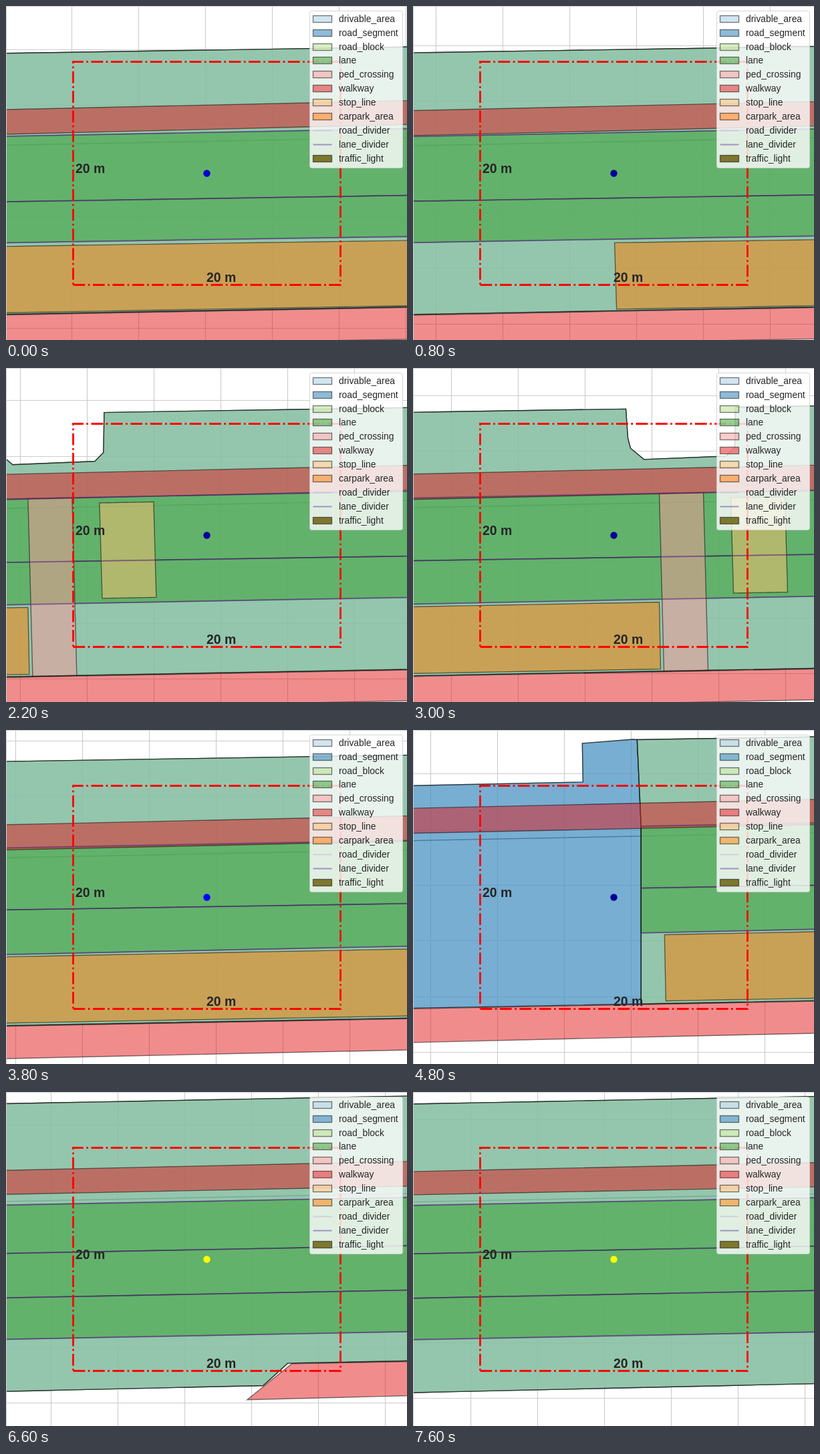
These frames come from a looping animation (600 px wide and 500 px high, 7.8 s). An HTML page:

```html
<!DOCTYPE html>
<html lang="en">
<head>
<meta charset="utf-8">
<title>Map patch drive</title>
<style>
  html, body { margin: 0; width: 100%; height: 100%; overflow: hidden; background: #fff; }
  svg { display: block; width: 600px; height: 500px; }
  text { font-family: "Liberation Sans", Arial, sans-serif; fill: #262626; }
  .area { fill-opacity: .5; stroke: #000; stroke-opacity: .5; stroke-width: 1.39; }
  .line { fill: none; stroke-width: 2.08; stroke-opacity: .5; }
  .thin { stroke-width: 1.39; }
  .grid { fill: none; stroke: #ccc; stroke-width: 1.11; }
  .size { font-size: 19.44px; font-weight: bold; }
  .label { font-size: 13.89px; }
</style>
</head>
<body>
<svg id="stage" viewBox="0 0 600 500"></svg>
<script>
const STEP = 200, STEPS = 39;
const EAST = 700, WEST = -3300;
const COLORS = {
  drivable_area: '#a6cee3', road_segment: '#1f78b4', road_block: '#b2df8a',
  lane: '#33a02c', ped_crossing: '#fb9a99', walkway: '#e31a1c',
  stop_line: '#fdbf6f', carpark_area: '#ff7f00',
  road_divider: '#cab2d6', lane_divider: '#6a3d9a', traffic_light: '#7e772e'
};

const stage = document.getElementById('stage');

function add(parent, tag, attrs, text) {
  const node = document.createElementNS('http://www.w3.org/2000/svg', tag);
  for (const key in attrs) node.setAttribute(key, attrs[key]);
  if (text) node.textContent = text;
  return parent.appendChild(node);
}

// Every road edge is a gentle parabola y(x) in map coordinates.
const curve = (y, slope, bend = 0) => x => y - slope * x + bend * 1e-6 * x * x;
const shifted = (edge, dy) => x => edge(x) + dy;
const on = (edge, x) => [x, edge(x)];
const trace = (edge, from, to, n = 16) =>
  Array.from({ length: n + 1 }, (_, i) => on(edge, from + (to - from) * i / n));
const band = (upper, lower, from, to) => [...trace(upper, from, to), ...trace(lower, to, from)];
const block = (upper, lower, from, to, skew) =>
  [...trace(upper, from, to), ...trace(lower, to + skew, from + skew)];

const edges = {
  topEast: curve(70.8, .0158),
  topWest: curve(64.4, .019),
  bottomEast: curve(461.5, .0187),
  bottomWest: curve(485.6, .0224),
  inner: curve(208.5, .0198),
  walkTop: curve(155, .0223),
  walkBottom: curve(192, .024, -.75),
  sidewalkBottom: curve(508.9, .0174, 1.62),
  carparkTop: curve(359.9, .0155, 1.5),
  carparkBottom: curve(459.3, .0177)
};
const lanesEast = [curve(195, .019), curve(293, .0158), curve(354.5, .0165, 1.6)];
const lanesWest = [215.6, 288, 354.5, 416.6].map(y => curve(y, .0192));
const laneEast = -1687, laneWest = -2106;

const eastSide = [on(edges.topEast, -1693), [laneEast, 228], on(edges.bottomEast, laneEast)];
const westSide = [on(edges.topWest, -2110), [laneWest, 256], [laneWest, 457], on(edges.bottomEast, -2100)];
const driveway = [[-937, 44], [-933, 59], [-913, 76], [-790, 73], [-777, 60]]
  .map(([x, depth]) => [x, edges.topEast(x) + depth]);

const roadEast = [
  ...trace(edges.topEast, -1693, -940), ...driveway, ...trace(edges.topEast, -776, EAST),
  ...trace(edges.bottomEast, EAST, laneEast), eastSide[1]
];
const roadWest = [
  ...trace(edges.topWest, WEST, -2110), ...westSide,
  on(edges.bottomEast, -2347), ...trace(edges.bottomWest, -2384, WEST)
];
const junction = [
  [-2039, 101], [-2037, 166.5], [-1774, 161], [-1775, 103], [-1699, 97],
  ...eastSide, ...[...westSide].reverse()
];

function buildMap(map) {
  const areas = (kind, ...shapes) => shapes.forEach(points =>
    add(map, 'polygon', { class: 'area', fill: COLORS[kind], points: points.join(' ') }));
  const line = (points, stroke, style = 'line') =>
    add(map, 'polyline', { class: style, stroke, points: points.join(' ') });
  const lanes = (lines, from, to) =>
    lines.slice(1).map((lower, i) => band(lines[i], lower, from, to));

  areas('drivable_area', roadEast, junction, roadWest);
  line(trace(edges.inner, WEST, EAST), '#000', 'line thin');
  areas('road_segment', roadEast, junction, roadWest);
  areas('road_block', roadEast, roadWest);
  areas('lane', ...lanes(lanesEast, laneEast, EAST), ...lanes(lanesWest, WEST, laneWest));
  areas('ped_crossing', block(lanesEast[0], edges.bottomEast, -890, -824, 7));
  areas('walkway',
    band(edges.walkTop, edges.walkBottom, WEST, EAST),
    [...trace(shifted(edges.bottomEast, 1), -2341, EAST), ...trace(edges.sidewalkBottom, EAST, -2408)]);
  areas('stop_line', block(shifted(lanesEast[0], 8.6), shifted(lanesEast[2], -7), -783, -702, 4));
  areas('carpark_area',
    block(edges.carparkTop, edges.carparkBottom, -34, EAST, 3),
    block(edges.carparkTop, edges.carparkBottom, -1652, -890, 2));
  lanesEast.forEach(lane => line(trace(lane, laneEast, EAST), COLORS.lane_divider));
  lanesWest.forEach(lane => line(trace(lane, WEST, laneWest), COLORS.lane_divider));
}

function buildLegend() {
  add(stage, 'rect', {
    x: 454.5, y: 7.5, width: 139, height: 235, rx: 3,
    fill: '#fff', 'fill-opacity': .8, stroke: '#ccc', 'stroke-opacity': .8
  });
  Object.entries(COLORS).forEach(([name, color], i) => {
    const baseline = Math.round(23.7 + i * 20.9);
    if (name.endsWith('divider')) {
      add(stage, 'path', { class: 'line', stroke: color, d: `M459.5 ${baseline - 4.5}h28` });
    } else {
      const swatch = add(stage, 'rect', { class: 'area', x: 459.5, y: baseline - 9.5, width: 28, height: 10, fill: color });
      if (name === 'traffic_light') swatch.style.fillOpacity = 1;
    }
    add(stage, 'text', { class: 'label', x: 498, y: baseline }, name);
  });
}

const grid = add(stage, 'path', { class: 'grid' });
const map = add(stage, 'g', {});
buildMap(map);
add(stage, 'path', { class: 'grid', d: 'M.5 500V.5H600' });
add(stage, 'path', {
  d: 'M100.5 417.5H500.5V83.5H100.5Z', fill: 'none', stroke: '#f00',
  'stroke-width': 2.78, 'stroke-dasharray': '17.78 4.44 2.78 4.44'
});
const marker = add(stage, 'circle', { cx: 300.5, cy: 250.5, r: 5.2 });
add(stage, 'text', { class: 'size', x: 104, y: 250 }, '20 m');
add(stage, 'text', { class: 'size', x: 300, y: 413 }, '20 m');
buildLegend();

function ease(step, from, span) {
  const u = Math.min(1, Math.max(0, (step - from) / span));
  return u * u * (3 - 2 * u);
}

// Grid lines sit on whole pixels.
function gridPath(x, y) {
  const dx = 100, dy = 250 / 3;
  let d = '';
  for (let gx = x % dx; gx < 600; gx += dx) d += `M${Math.floor(gx) + .5} 0V500`;
  for (let gy = (y % dy + dy) % dy; gy < 500; gy += dy) d += `M0 ${Math.floor(gy) + .5}H600`;
  return d;
}

function markerColor(step) {
  if (step >= 27) return '#ff0';
  if (step >= 18 && step < 22) return '#00f';
  return step < 4 ? '#0000c8' : '#000096';
}

function render(time) {
  const step = Math.floor(time / STEP) % STEPS;
  // Steady drive with a short surge, and one lane change.
  const x = 83.9 * step + 22 * (ease(step, 15, 4) - ease(step, 19, 13));
  const y = -1.5 * step - 50 * ease(step, 13.6, 12.2);
  map.setAttribute('transform', `translate(${x.toFixed(2)} ${y.toFixed(2)})`);
  grid.setAttribute('d', gridPath(x + 98.5, y + 65.5));
  marker.setAttribute('fill', markerColor(step));
}

const start = performance.now();
function tick() {
  render(performance.now() - start);
  requestAnimationFrame(tick);
}
tick();
</script>
</body>
</html>
```
